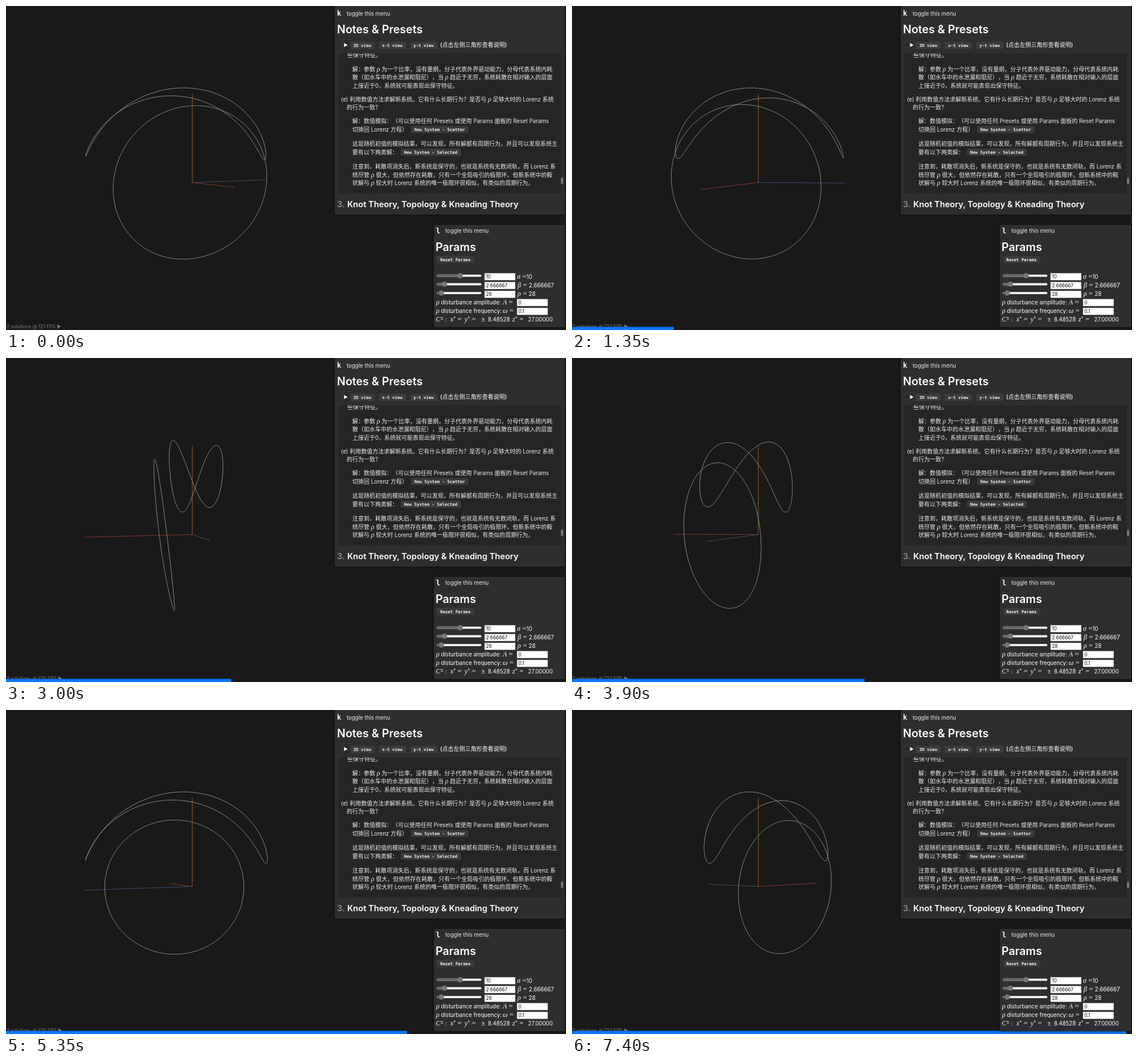
An HTML page for the animation above (7450 ms loop, 983 by 570 pixels).

```html
<!DOCTYPE html>
<html lang="zh-CN">
<head>
<meta charset="utf-8">
<style>
  html, body { margin: 0; width: 100%; height: 100%; overflow: hidden; background: #191919; }
  svg { display: block; width: 983px; height: 570px; font: 10px Inter, "Noto Sans CJK SC", "Noto Sans CJK", sans-serif; fill: #ececec; text-spacing-trim: space-all; }
  text { white-space: pre; }
  .en { font-size: 9.7px; }
  .math { font: italic 12px "Liberation Serif", "Noto Serif", serif; }
  .op { font: 13px "Liberation Serif", "Noto Serif", serif; }
  .mono { font: bold 7.4px "DejaVu Sans Mono", monospace; fill: #f0f0f0; }
  .key { font: bold 12px "DejaVu Sans Mono", monospace; fill: #fff; }
  .head { font-weight: 600; fill: #fff; }
  .tip { font-weight: 500; fill: #fff; }
  .field { font-size: 8.3px; fill: #111; }
  #fps { font-size: 8.4px; fill: #777; }
  .line { fill: none; stroke-width: 1; stroke-opacity: .85; }
</style>
</head>
<body>
<svg viewBox="0 0 983 570">
  <defs>
    <filter id="soft" x="-10%" y="-10%" width="120%" height="120%"><feDropShadow dx="0" dy="0" stdDeviation="2.5" flood-color="#000" flood-opacity=".6"/></filter>
    <clipPath id="notes"><rect x="583" y="83.5" width="391" height="247"/></clipPath>
  </defs>
  <g id="scene">
    <path id="x" class="line" stroke="#b0443a" stroke-dasharray="5 .7"/>
    <path id="y" class="line" stroke="#525d88" stroke-dasharray="5 .7"/>
    <path id="z" class="line" stroke="#b8774a" stroke-dasharray="6 .7"/>
    <path id="saddle" class="line" stroke="#a3a08c"/>
    <path id="ring" class="line" stroke="#8ba398"/>
  </g>
  <text id="fps" x="1" y="566.5"></text>
  <rect id="bar" y="564.5" height="5.5" fill="#0a78f5"/>
  <g id="panels"></g>
</svg>
<script>
const $ = id => document.getElementById(id);

// ---- static panels ----
const rect = (x, y, w, h, fill, more = '') =>
  `<rect x="${x}" y="${y}" width="${w}" height="${h}" fill="${fill}" ${more}/>`;
const text = (x, y, s, cls = '', size = '') =>
  `<text x="${x}" y="${y}" class="${cls}" ${size && `style="font-size:${size}px"`}>${s}</text>`;
const span = (cls, s) => `<tspan class="${cls}">${s}</tspan>`;
// Latin runs are a little smaller than the Chinese; Greek letters are set as maths.
const mixed = (x, y, s) => text(x, y, s
  .replace(/[ -~]+/g, run => span('en', run))
  .replace(/[ρσβω]/g, letter => span('math', letter)));
// A maths letter with an optional raised mark.
const math = (s, sup = '') => span('math', s) +
  (sup && `<tspan dy="-3.5" font-size="8">${sup}</tspan><tspan dy="3.5">&#8203;</tspan>`);
const EQ = span('op', ' = ');
const button = (x, y, w, s) =>
  rect(x, y, w, 12.5, '#3b3b3b', 'rx="2.5"') + text(x + 5.7, y + 9, s, 'mono');
const slider = (y, knob) =>
  rect(756, y - 2, 78.5, 4, '#eee', 'rx="2"') + rect(756, y - 2, knob - 756, 4, '#666', 'rx="2"') +
  `<circle cx="${knob}" cy="${y}" r="4.7" fill="#757575"/>`;
const field = (x, y, s) =>
  rect(x, y, 54, 12.5, '#fff', 'stroke="#777" stroke-width=".6"') + text(x + 2.5, y + 9.3, s, 'field');

const notes = [
  [599, 90.3, '些保守特征。'],
  [608, 114.5, '解：参数 ρ 为一个比率，没有量纲，分子代表外界驱动能力，分母代表系统内耗'],
  [608, 129.2, '散（如水车中的水泄漏和阻尼），当 ρ 趋近于无穷，系统耗散在相对输入的层面'],
  [608, 143.8, '上接近于0，系统就可能表现出保守特征。'],
  [588, 167.7, '(e) 利用数值方法求解新系统。它有什么长期行为？是否与 ρ 足够大时的 Lorenz 系统'],
  [598, 182.4, '的行为一致？'],
  [608, 206.3, '解：数值模拟：（可以使用任何 Presets 或使用 Params 面板的 Reset Params'],
  [608, 220.6, '切换回 Lorenz 方程）'],
  [608, 246.2, '这是随机初值的模拟结果，可以发现，所有解都有周期行为，并且可以发现系统主'],
  [608, 260.7, '要有以下两类解：'],
  [608, 286.2, '注意到，耗散项消失后，新系统是保守的，也就是系统有无数闭轨，而 Lorenz 系'],
  [608, 300.8, '统尽管 ρ 很大，但依然存在耗散，只有一个全局吸引的极限环。但新系统中的鞍'],
  [608, 315.3, '状解与 ρ 较大时 Lorenz 系统的唯一极限环很相似，有类似的周期行为。']
];

$('panels').innerHTML =
  rect(577, -4, 404, 371, '#2e2e2e', 'rx="2" filter="url(#soft)"') +
  text(581, 17, 'k', 'key') + text(598, 16.6, 'toggle this menu', 'en') +
  text(581, 48.4, 'Notes &amp; Presets', 'head', 19.6) +
  '<path d="M593.5 65.3L599.5 68.8L593.5 72.3Z" fill="#fff"/>' +
  button(604, 63, 43.5, '3D view') + button(654.5, 63, 48, 'x-t view') + button(709.5, 63, 48, 'y-t view') +
  text(762, 72.4, '(点击左侧三角形查看说明)', 'tip') +
  rect(583, 83.5, 391, 247, '#252525', 'rx="2"') +
  `<g clip-path="url(#notes)">${notes.map(n => mixed(...n)).join('')}</g>` +
  button(711, 211, 100.5, 'New System - Scatter') + button(693, 251, 105.5, 'New System - Selected') +
  rect(974, 302, 4, 11, '#777', 'rx="1.5"') +
  text(581, 354, '<tspan fill="#888">3.</tspan>', 'head', 14.6) +
  text(599, 354, 'Knot Theory, Topology &amp; Kneading Theory', 'head', 14.65) +

  rect(751, 385, 230, 180, '#2e2e2e', 'rx="2" filter="url(#soft)"') +
  text(755, 399.5, 'l', 'key') + text(771, 399.2, 'toggle this menu', 'en') +
  text(754, 431, 'Params', 'head', 19.6) +
  button(756.5, 439.5, 65.5, 'Reset Params') +
  slider(474.5, 797) + slider(489.5, 769.5) + slider(505, 764) +
  field(840, 470, '10') + field(840, 485.5, '2.666667') + field(840, 501, '28') +
  field(897, 515.5, '0') + field(897, 531, '0.1') +
  '<g fill="#fff">' +
  text(897, 479.5, math('σ') + span('op', ' =') + '10', 'en') +
  text(898, 494.6, math('β') + EQ + '2.666667', 'en') +
  text(898, 510, math('ρ') + EQ + '28', 'en') +
  mixed(755, 525, 'ρ disturbance amplitude:') + text(872, 525, math('A') + EQ) +
  mixed(755, 540.3, 'ρ disturbance frequency:') + text(872, 540.3, math('ω') + EQ) +
  text(754.5, 555.2, math('C', '±') + ' :') +
  text(780, 555.2, math('x', '*') + EQ) + text(805, 555.2, math('y', '*') + EQ) +
  text(834, 555.2, '±', 'op') + text(846, 555.2, '8.48528', 'en') +
  text(889, 555.2, math('z', '*') + EQ) + text(916.5, 555.2, '27.00000', 'en') +
  '</g>';

// ---- scene: off-centre perspective, turning about the vertical axis ----
const AXIS = 153.5, DEPTH = 0.001974, K = 10.5;
let cos, sin;
const project = ([x, y, z]) => {
  const right = x * cos + y * sin, near = x * sin - y * cos, q = 1 / (1 - DEPTH * near);
  return (514 + (right - 187) * q).toFixed(2) + ' ' + (282 + (28.5 - z) * q).toFixed(2);
};
const draw = (id, points) => $(id).setAttribute('d', 'M' + points.map(project).join('L'));
const closed = fn => Array.from({ length: 241 }, (_, i) => fn(i * Math.PI / 120));

// Orbits of x' = y, y' = -xz, z' = xy: a cylinder y²+z² = R² cut by z = C + x²/K.
const R = 156.9, C = 42.5;
const saddle = closed(a => {
  const z = C + (R - C) * Math.sin(a) ** 2;
  return [Math.sqrt(K * (R - C)) * Math.sin(a), Math.cos(a) * Math.sqrt((R - C) * (R + z)), z];
});
const ring = closed(a => {
  const z = 124.4 * Math.cos(a);
  return [Math.sqrt(2280 + K * z), 124.4 * Math.sin(a), z];
});

function frame(now) {
  const t = Math.floor(now % 7450 / 50) * 50;
  const angle = (49.5 + 0.0341 * t) * Math.PI / 180;
  cos = Math.cos(angle);
  sin = Math.sin(angle);
  const O = [0, 0, 0];
  draw('x', [O, [AXIS, 0, 0]]);
  draw('y', [O, [0, AXIS, 0]]);
  draw('z', [O, [0, 0, 156]]);
  draw('saddle', saddle);
  draw('ring', ring);
  $('fps').textContent = `2 solutions @ ${t < 1000 ? 121 : 120} FPS ▶`;
  $('bar').setAttribute('width', t ? 1.5 + 0.1313 * t : 0);
  requestAnimationFrame(frame);
}
frame(0);
</script>
</body>
</html>
```
